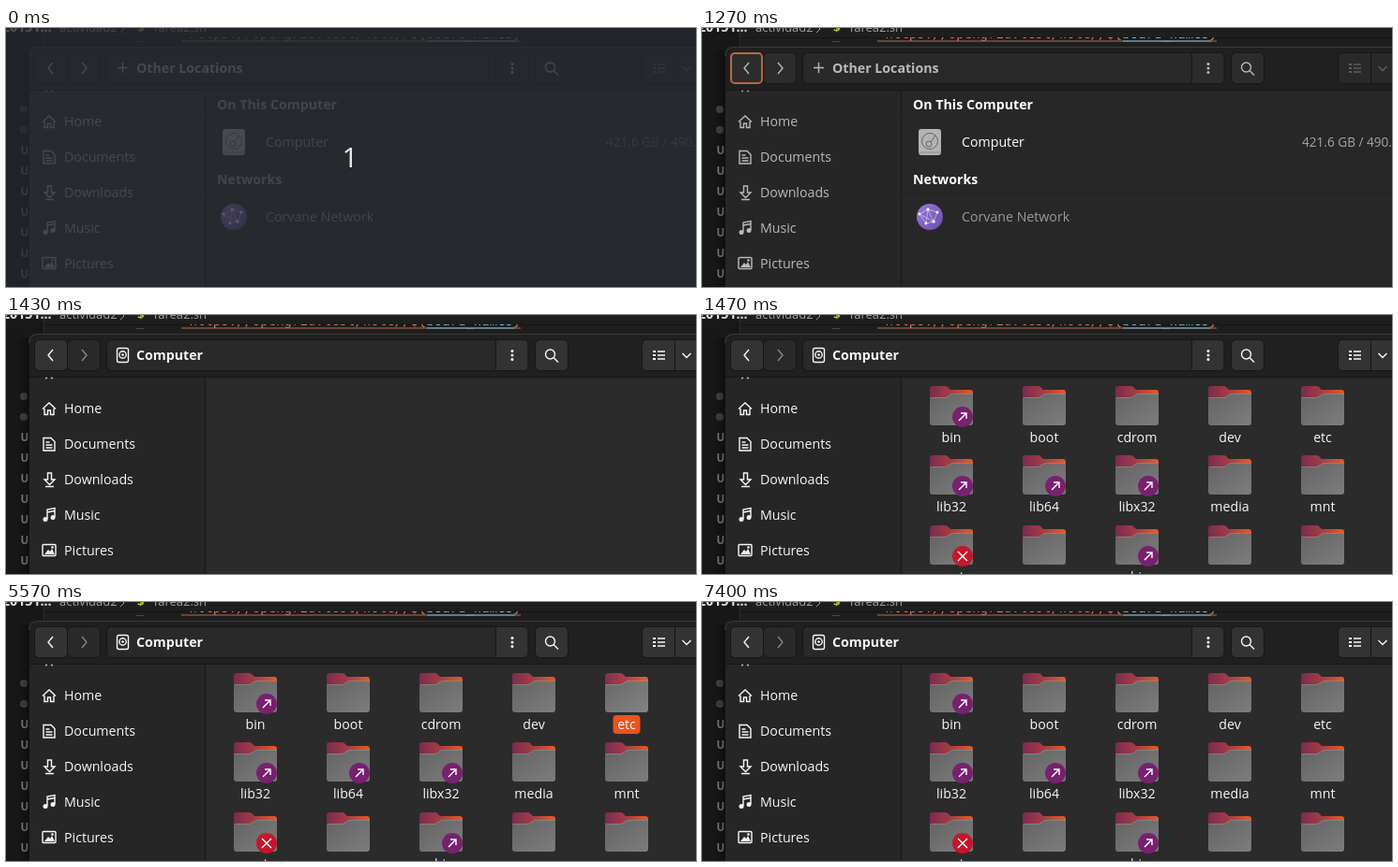
Write an HTML page that moves like this. It is 736x277 px and loops after 8000 ms.

```html
<!DOCTYPE html>
<html lang="en">
<head>
<meta charset="utf-8">
<title>File manager</title>
<style>
  html, body { margin: 0; height: 100%; overflow: hidden; background: #181818; }
  svg { display: block; width: 736px; height: 277px; }
  text { font: 14.2px "Open Sans", sans-serif; white-space: pre; }
  .b { font-weight: 700; }
  .code { font: 14px "DejaVu Sans Mono", monospace; }
  .u { font: 700 11.5px "Open Sans", sans-serif; fill: #8a8a8a; }
  .crumb { font-size: 13px; fill: #a0a0a0; }
  .main { fill: var(--text); }
  .line { fill: none; stroke: var(--text); stroke-width: 1.4; }
  .head { fill: var(--strong); }
  .btn { fill: var(--btn); stroke: #161616; }
  .label { fill: #f7f7f7; text-anchor: middle; }
</style>
</head>
<body>
<svg viewBox="0 0 736 277">
  <defs>
    <linearGradient id="tab"><stop stop-color="#7b2b4f"/><stop offset=".45" stop-color="#a33b45"/><stop offset="1" stop-color="#e95a24"/></linearGradient>
    <linearGradient id="front" x2="1" y2="1"><stop stop-color="#636363"/><stop offset="1" stop-color="#7d7d7d"/></linearGradient>
    <linearGradient id="globe" x2="1" y2="1"><stop stop-color="#9a7bd0"/><stop offset="1" stop-color="#6a4bb4"/></linearGradient>
    <linearGradient id="shade"><stop stop-color="#000" stop-opacity="0"/><stop offset="1" stop-color="#000" stop-opacity=".35"/></linearGradient>
    <clipPath id="codeClip"><rect y="10" width="736" height="10"/></clipPath>
    <g id="folder">
      <path d="M-23 10V-39q0-3 3-3H-7q2 0 3 1l3 3H20q3 0 3 3V-10H-23z" transform="translate(0 42)" fill="url(#tab)"/>
      <path d="M-23 14q0-2 2-2H-7q2 0 3-1l3-2q1-1 3-1H21q2 0 2 2V39q0 3-3 3H-20q-3 0-3-3z" fill="url(#front)"/>
      <path d="M-22.5 12.5H-7q2 0 3-1l3-2q1-1 3-1H22.5" fill="none" stroke="#999" stroke-opacity=".5"/>
    </g>
    <g id="link" stroke="#fff" stroke-width="1.4" fill="none">
      <circle r="11" fill="#77216f" stroke="none"/><path d="M-4 4L4-4M-2-4H4V2"/>
    </g>
    <g id="deny" stroke="#fff" stroke-width="1.4">
      <circle r="11" fill="#c7162b" stroke="none"/><path d="M-5-5L5 5M5-5L-5 5"/>
    </g>
  </defs>

  <!-- editor behind the window -->
  <rect width="736" height="277" fill="#181818"/>
  <rect x="40" width="696" height="40" fill="#1e1e1e"/>
  <path d="M40.5 0V20" stroke="#2b2b2b"/>
  <path d="M41 10.5H736" stroke="#141414"/>
  <text class="b" x="-4" y="4" font-size="13" fill="#ddd">20151...</text>
  <text class="crumb" x="57" y="4">actividad2</text>
  <path d="M122-3l4 4-4 4" fill="none" stroke="#a0a0a0"/>
  <text class="crumb b" x="140" y="4" style="fill:#b5c936">$</text>
  <text class="crumb" x="156" y="4">Tarea2.sh</text>
  <g clip-path="url(#codeClip)">
    <text class="code" x="139" y="11" fill="#8a5a5a">_</text>
    <text class="code" x="187" y="11" fill="#ce7f5c">"https://opengrid.test/note//${<tspan fill="#7cc4ee">board_names</tspan>}</text>
    <path d="M187 14H549" stroke="#b56a4c" stroke-width="1.2"/>
    <path d="M449 14H543" stroke="#62b0dc" stroke-width="1.2"/>
  </g>
  <circle cx="19" cy="87" r="4" fill="#4a4a4a"/>
  <circle cx="19" cy="109" r="4" fill="#4a4a4a"/>
  <g id="marks"></g>
  <rect x="10" y="24" width="14" height="253" fill="url(#shade)"/>

  <!-- window -->
  <path d="M24 277V29q0-9 9-9H736V277z" fill="var(--bar)"/>
  <path d="M25 30q0-9.500 9-9.500H736" fill="none" stroke="#3a3a3a"/>
  <rect x="24" y="67" width="188" height="210" fill="var(--side)"/>
  <rect x="213" y="67" width="523" height="210" fill="var(--pane)"/>
  <path d="M24 66.500H736M212.500 67V277" stroke="#171717"/>
  <path d="M24.500 30V277" stroke="#111"/>

  <g>
    <rect class="btn" x="30.500" y="26.500" width="35" height="33" rx="5"/>
    <rect class="btn" id="fwdBtn" x="65.500" y="26.500" width="35" height="33" rx="5"/>
    <rect x="107.500" y="26.500" width="449" height="33" rx="5" fill="#292929" stroke="#161616"/>
    <path class="btn" d="M522.500 26.500H552q5 0 5 5V54q0 5.500-5 5.500H522.500z"/>
    <rect class="btn" x="564.500" y="26.500" width="35" height="33" rx="5"/>
    <rect class="btn" id="viewBtn" x="678.500" y="26.500" width="70" height="33" rx="5"/>
    <path d="M713.500 27V59" stroke="#161616"/>
    <rect id="ring" x="31" y="27" width="33" height="32" rx="4" fill="none" stroke="#b8654c" stroke-width="2"/>
    <path class="line" d="M50 37l-5 6 5 6"/>
    <path id="fwd" class="line" d="M81 37l5 6-5 6"/>
    <g class="main"><circle cx="540" cy="38.500" r="1.500"/><circle cx="540" cy="43" r="1.500"/><circle cx="540" cy="47.500" r="1.500"/></g>
    <circle class="line" cx="580.500" cy="42" r="5"/><path class="line" d="M584 45.500l5 5"/>
    <g id="view" fill="none" stroke="var(--view)" stroke-width="2">
      <path d="M690 39h3M690 43h3M690 47h3"/><path d="M695 39h8M695 43h8M695 47h8" stroke-width="1.300"/>
      <path d="M721.500 41l4.500 4.500 4.500-4.500" stroke-width="1.500"/>
    </g>
  </g>

  <!-- sidebar -->
  <path class="line" d="M42 68l2-1M48 67l2 1" opacity=".7"/>
  <g id="places"></g>
  <g class="line">
    <path d="M39 100.500l7-6.500 7 6.500M41 100v6.500h3.500v-4.500h3v4.500H51V100"/>
    <path d="M40 131.500h8l4 4v9.500H40zM42.500 136h4M42.500 139h7M42.500 142h7"/>
    <path d="M44.500 169v7H41l5.500 5.500L52 176h-3.500v-7zM42 183.500h9"/>
    <path d="M44 218v-10l8-1.500v9.500M44 211l8-1.500"/>
    <rect x="39" y="245.500" width="14" height="12" rx="1"/>
  </g>
  <g class="main"><circle cx="42" cy="218.500" r="2.500"/><circle cx="50" cy="216.500" r="2.500"/><path d="M41 256l4-5 2 2 2-3 3 6z"/><circle cx="49.500" cy="248.500" r="1.300"/></g>

  <!-- locations list -->
  <g id="other">
    <path class="line" d="M119 42.500h11M124.500 37v11"/>
    <text class="b main" x="139" y="48">Other Locations</text>
    <path d="M213 96.500H736M213 176.500H736" stroke="#242424"/>
    <text class="b head" x="225" y="87">On This Computer</text>
    <text class="head" x="277" y="127">Computer</text>
    <text x="640" y="127" style="font-size:13.6px" fill="var(--size)">421.6 GB / 490.6 GB available</text>
    <text class="b head" x="225" y="167">Networks</text>
    <text x="277" y="207" fill="#9a9a9a">Corvane Network</text>
    <rect x="231" y="108" width="24" height="28" rx="3" fill="#b4b4b4"/>
    <path d="M231 133h24" stroke="#8b8b8b"/>
    <g fill="none" stroke="#666"><circle cx="243" cy="121" r="8.500"/><circle cx="242" cy="124" r="3"/><path d="M244 122l5-7"/></g>
    <circle cx="243" cy="202" r="14" fill="url(#globe)"/>
    <path d="M232 199l9-5 10 3-4 10-8 2-7-10 15 8M241 194l-2 15M241 194l6 13" fill="none" stroke="#cdbcf0" stroke-width=".8"/>
    <g fill="#fff"><circle cx="232" cy="199" r="1.400"/><circle cx="241" cy="194" r="1.600"/><circle cx="251" cy="197" r="1.500"/><circle cx="247" cy="207" r="1.700"/><circle cx="239" cy="209" r="1.400"/></g>
  </g>

  <!-- computer folder -->
  <g id="computer">
    <g class="line"><rect x="118.500" y="35.500" width="12" height="15" rx="2"/><circle cx="124.500" cy="42.500" r="3.700"/></g>
    <circle class="main" cx="124.500" cy="42.500" r="1.300"/>
    <text class="b main" x="139" y="48">Computer</text>
  </g>
  <g id="grid"></g>

  <g id="count">
    <rect width="736" height="277" fill="#24282e" opacity=".76"/>
    <text x="367" y="149" text-anchor="middle" style="font-size:30px" fill="#e8e8e8">1</text>
  </g>
</svg>
<script>
const $ = id => document.getElementById(id);
const LOOP = 8000, FOCUS = 1270, OPEN = 1430, LIST = 1470;

$('marks').innerHTML = [...Array(7).keys()]
  .map(i => `<text class="u" x="15.500" y="${135 + 22 * i}">U</text>`).join('');
$('places').innerHTML = ['Home', 'Documents', 'Downloads', 'Music', 'Pictures']
  .map((s, i) => `<text class="main" x="62" y="${105 + 38 * i}">${s}</text>`).join('');

const names = 'bin boot cdrom dev etc lib32 lib64 libx32 media mnt root run sbin snap srv'.split(' ');
const links = ['bin', 'lib32', 'lib64', 'libx32', 'sbin'];
const emblem = s => links.includes(s) ? 'link' : s === 'root' ? 'deny' : '';
$('grid').innerHTML = names.map((s, i) => {
  const x = 266 + 99 * (i % 5), y = 76 + Math.floor(74.5 * Math.floor(i / 5));
  const e = emblem(s), w = s === 'mnt' ? 35 : 29;
  return `<g id="item-${s}" transform="translate(${x} ${y})"><use href="#folder"/>
    ${e && `<use href="#${e}" x="12" y="33"/>`}
    <rect class="pill" x="${-w / 2}" y="45" width="${w}" height="20" rx="4" fill="#e95420"/>
    <text class="label" y="60">${s}</text></g>`;
}).join('');

const picks = [['etc', 5570, 6800], ['mnt', 6800, 7070], ['srv', 7070, 7400]];
const show = (el, on) => { el.style.display = on ? '' : 'none'; };
const setVar = (k, v) => document.documentElement.style.setProperty('--' + k, v);
const grey = (a, b, p) => { const v = Math.round(a + (b - a) * p); return `rgb(${v},${v},${v})`; };

function draw(t) {
  const focused = t >= FOCUS, open = t >= OPEN;
  const p = focused ? Math.min(1, .15 + (t - FOCUS) / 180) : 0;
  setVar('text', grey(174, 247, p));
  setVar('strong', focused ? '#fff' : '#a0a0a0');
  setVar('size', focused ? '#a3a3a3' : '#6b6b6b');
  setVar('bar', grey(38, 32, focused ? 1 : 0));
  setVar('side', focused ? '#262626' : '#323232');
  setVar('pane', open ? '#2b2b2b' : focused ? '#272727' : '#2e2e2e');
  setVar('btn', grey(43, 51, p));
  setVar('view', open ? '#f7f7f7' : '#5c5c5c');
  $('viewBtn').style.fill = open ? '' : '#292929';
  $('fwdBtn').style.fill = open ? '#292929' : '';
  $('fwd').style.stroke = open ? '#858585' : '';
  show($('ring'), focused && !open);
  show($('other'), !open);
  show($('computer'), open);
  show($('grid'), t >= LIST);
  show($('count'), t < 30);
  const pick = picks.find(([, a, b]) => t >= a && t < b);
  for (const s of names) {
    const item = $('item-' + s), on = !!pick && pick[0] === s;
    show(item.querySelector('.pill'), on);
    item.querySelector('use').style.filter = on ? 'brightness(1.05)' : '';
  }
}

const start = performance.now();
function tick() {
  draw((performance.now() - start) % LOOP);
  requestAnimationFrame(tick);
}
tick();
</script>
</body>
</html>
```
